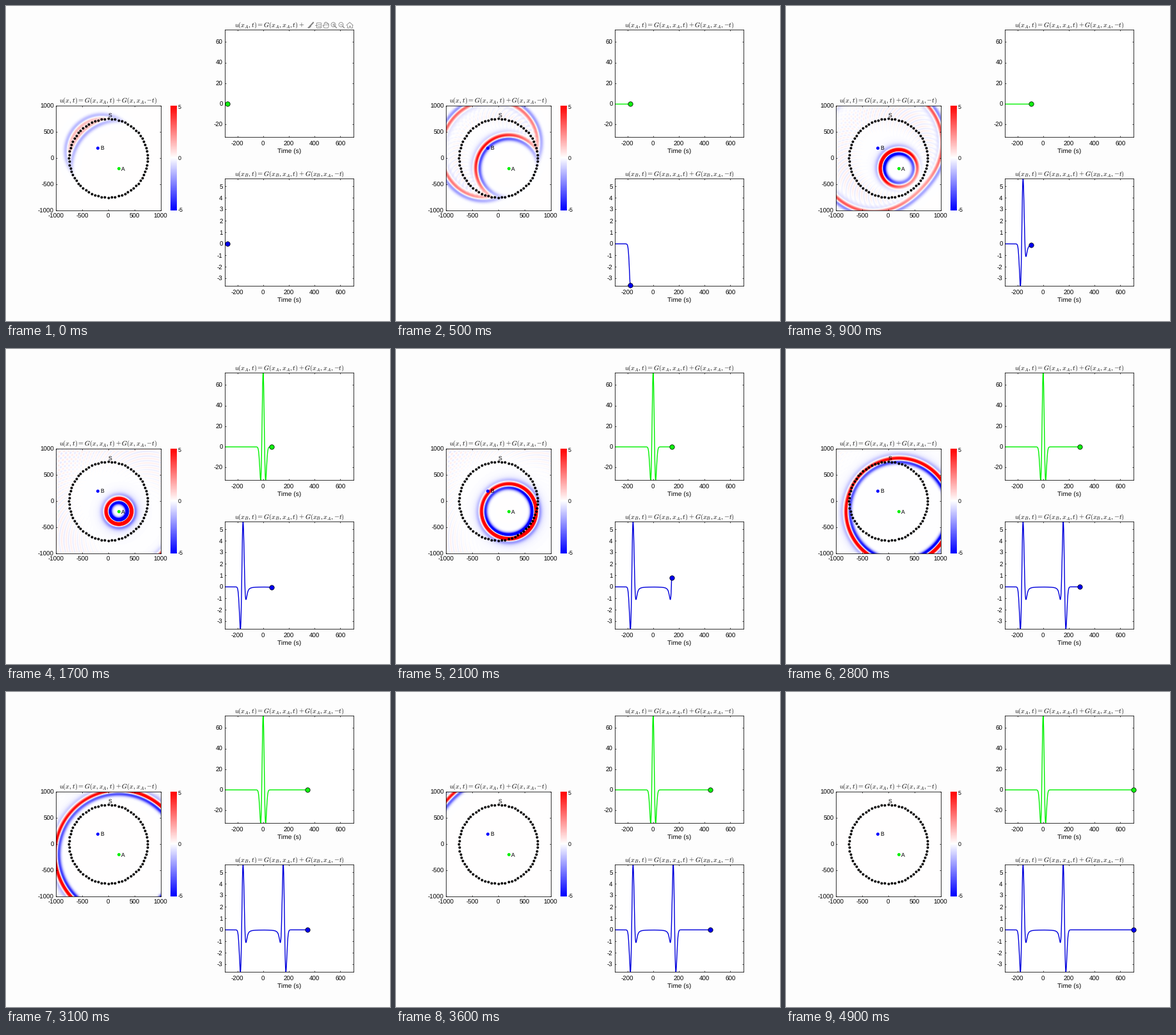
Recreate the animation shown at these times as a matplotlib script. Size 600 by 493 pixels, loop 5000 ms.

```python
import numpy as np
import matplotlib.pyplot as plt
from matplotlib.animation import FuncAnimation
from matplotlib.colors import LinearSegmentedColormap
from matplotlib.patches import Circle, Polygon, Rectangle

W, H, DPI = 600, 493, 64
PX = 72 / DPI  # points per pixel
FRAMES, INTERVAL = 50, 100

SPEED, FREQ, RADIUS, N_SOURCES = 3.5, 0.02, 750, 72
A, B = (200, -200), (-200, 200)
T_MIN, T_MAX = -300, 704

plt.rcParams["font.family"] = "Liberation Sans"
plt.rcParams["mathtext.fontset"] = "cm"
plt.rcParams["text.hinting"] = "none"

# --- wave field: unit sources on a circle, each firing so its pulse meets A at t = 0
theta = 2 * np.pi * np.arange(N_SOURCES) / N_SOURCES
src_x, src_y = RADIUS * np.cos(theta), RADIUS * np.sin(theta)
src_to_a = np.hypot(src_x - A[0], src_y - A[1])


def ricker(t):
    q = (np.pi * FREQ * t) ** 2
    return (1 - 2 * q) * np.exp(-q)


def delays(x, y):
    shape = (-1,) + (1,) * np.ndim(x)
    sx, sy, d = (v.reshape(shape) for v in (src_x, src_y, src_to_a))
    return ((np.hypot(x - sx, y - sy) - d) / SPEED).astype(np.float32)


def trace(point, times):
    return ricker(times - delays(*point)[:, None]).sum(axis=0)


grid = np.linspace(-1000, 1000, 164)
field_delays = delays(*np.meshgrid(grid, grid))


def field(t):
    return ricker(np.float32(t) - field_delays).sum(axis=0)


# --- layout in stage pixels
fig = plt.figure(figsize=(W / DPI, H / DPI), dpi=DPI, facecolor="#fdfdfd")


def panel(left, top, right, bottom):
    return fig.add_axes([left / W, 1 - bottom / H,
                         (right - left) / W, (bottom - top) / H])


stage = panel(0, 0, W, H)
stage.set(xlim=(0, W), ylim=(H, 0), zorder=1)
stage.axis("off")


def label(x, y, text, size=9.8, ha="center"):
    stage.text(x, y, text, fontsize=size * PX, ha=ha, va="baseline", color="black")


def box(ax, box_px, xlim, ylim, xticks, yticks, drop):
    left, top, right, bottom = box_px
    ax.set(xlim=xlim, ylim=ylim, xticks=xticks, yticks=yticks)
    ax.tick_params(direction="in", length=2 * PX, width=0.7 * PX, top=True,
                   right=True, labelbottom=False, labelleft=False)
    for spine in ax.spines.values():
        spine.set_linewidth(0.8 * PX)
    for v in xticks:
        x = left + (v - xlim[0]) / (xlim[1] - xlim[0]) * (right - left)
        label(x, bottom + drop, f"{v}")
    for v in yticks:
        y = bottom - (v - ylim[0]) / (ylim[1] - ylim[0]) * (bottom - top)
        label(left - 3, y + 3.5, f"{v}", ha="right")


# Map of the field
MAP = (78, 156, 241.5, 320)
ax_map = panel(*MAP)
cmap = LinearSegmentedColormap.from_list("bwr5", ["#0000ff", "#ffffff", "#ff0000"])
image = ax_map.imshow(np.zeros((164, 164)), cmap=cmap, vmin=-5, vmax=5,
                      origin="lower", extent=(-1000, 1000, -1000, 1000),
                      aspect="auto", interpolation="bilinear")
map_ticks = range(-1000, 1001, 500)
box(ax_map, MAP, (-1000, 1000), (-1000, 1000), map_ticks, map_ticks, 12.3)


def dots(x, y, color, size):
    ax_map.plot(x, y, "o", color=color, ms=size * PX, mew=0)


dots(src_x, src_y, "black", 4)
dots(*A, "#00f000", 5)
dots(*B, "#0000ff", 5)

# Colour bar
ax_bar = panel(256.5, 156, 266.5, 320)
ax_bar.imshow(np.linspace(-5, 5, 256)[:, None], cmap=cmap, origin="lower", aspect="auto")
ax_bar.axis("off")
for text, y in (("5", 161.3), ("0", 241.3), ("-5", 322.3)):
    label(268.7, y, text, 9, "left")


# Time histories
def history(box_px, ylim, yticks, point, color, fill):
    ax = panel(*box_px)
    box(ax, box_px, (T_MIN, T_MAX), ylim, range(-200, 601, 200), yticks, 14)
    label(442.5, box_px[3] + 25, "Time (s)", 10.2)
    times = np.arange(T_MIN, T_MAX + 1, 1.0)
    line, = ax.plot([], [], color=color, lw=1.4 * PX)
    head, = ax.plot([], [], "o", color=fill, ms=7.4 * PX, mec="black",
                    mew=0.7 * PX, clip_on=False, zorder=5)
    return line, head, times, trace(point, times)


histories = [
    history((341.6, 37, 543, 205), (-32.1, 72), range(-20, 61, 20),
            A, "#00f000", "#10ee10"),
    history((341.6, 270, 543, 438), (-3.65, 5.68), range(-3, 6),
            B, "#0000dc", "#0000ee"),
]


def title(x, y, at):
    pair = rf"{at},x_A,"
    label(x, y, rf"$u({at},t)=G({pair}t)+G({pair}{{-}}t)$", 10.25)


title(160, 151.8, "x")
title(442.6, 33.2, "x_A")
title(442.6, 266.2, "x_B")
label(180, 257.7, "A", 8.8, "left")
label(147.3, 224.9, "B", 8.8, "left")
label(159.5, 173.8, "S", 8.8, "left")

# --- hover toolbar, visible only at the start
GREY = "#808080"
toolbar = [stage.add_patch(Rectangle((467, 24), 78, 12, fc="#fdfdfd", ec="none", zorder=6))]


def stroke(points, width=0.8):
    xs, ys = zip(*points)
    toolbar.extend(stage.plot(xs, ys, color=GREY, lw=width * PX, zorder=7))


def shape(patch, fill="none"):
    patch.set(fc=fill, ec=GREY, lw=0.8 * PX, zorder=7)
    toolbar.append(stage.add_patch(patch))


stroke([(480, 26), (475.5, 31)], 2)
shape(Polygon([(475.5, 30.5), (476.5, 32), (474, 34.2), (471.5, 34.2)]), GREY)
shape(Rectangle((484.5, 26), 7.5, 8))
for y in (28.5, 31.5):
    stroke([(486.5, y), (490.5, y)])
stroke([(483, 30), (486, 30)])
shape(Polygon([(497.5, 34.5), (495, 30.5), (496, 29.8), (497.3, 31), (497.3, 26.5),
               (498.6, 26.5), (499, 25.3), (500.5, 25.3), (501, 26.3), (502.3, 26.3),
               (502.8, 27.8), (504.2, 27.8), (504.2, 31.5), (502.8, 34.5)]))
for x in (499, 500.8, 502.5):
    stroke([(x, 27), (x, 30)], 0.6)
for x in (511.5, 523.5):
    shape(Circle((x, 29.2), 3.5))
    stroke([(x + 2.6, 31.8), (x + 5, 34.3)], 1.2)
    stroke([(x - 1.8, 29.2), (x + 1.8, 29.2)])
stroke([(511.5, 27.4), (511.5, 31)])
stroke([(531.8, 30.2), (537, 25.5), (542.2, 30.2)])
stroke([(533.3, 29.5), (533.3, 34.3), (535.8, 34.3), (535.8, 31.2), (538.2, 31.2),
        (538.2, 34.3), (540.7, 34.3), (540.7, 29.5)])


def update(frame):
    now = -276 + 20 * frame
    image.set_data(field(now))
    for line, head, times, values in histories:
        past = times <= now
        line.set_data(times[past], values[past])
        head.set_data([now], [np.interp(now, times, values)])
    for artist in toolbar:
        artist.set_visible(frame == 0)


anim = FuncAnimation(fig, update, frames=FRAMES, interval=INTERVAL,
                     repeat=True, repeat_delay=0, blit=False)
plt.show()
```
